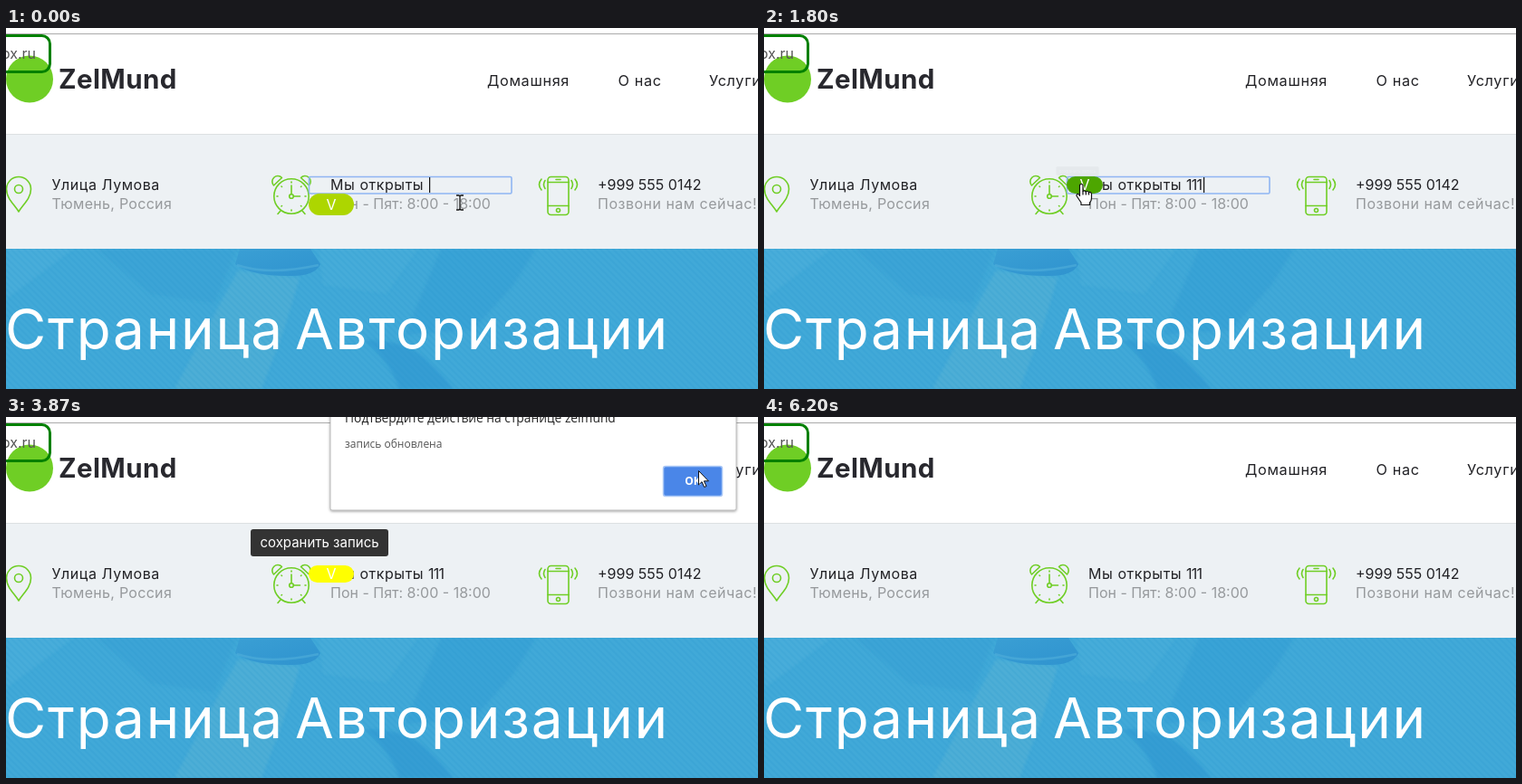
Animation, 830 px wide and 399 px high, one loop 6.63 s. Source, as an HTML page:

```html
<!DOCTYPE html>
<html lang="ru">
<head>
<meta charset="utf-8">
<title>Запись обновлена</title>
<style>
  html, body { margin: 0; width: 100%; height: 100%; overflow: hidden; background: #fff; }
  svg { display: block; width: 830px; height: 399px; }
  text { font-family: Inter, "Open Sans", sans-serif; font-size: 16px; font-optical-sizing: none; white-space: pre; }
  .dark { fill: #222226; letter-spacing: .55px; }
  .muted { fill: #96999c; letter-spacing: .3px; }
  .nav { fill: #222226; font-size: 16.3px; letter-spacing: .65px; }
  .title { fill: #fff; font-size: 62px; letter-spacing: 1.8px; }
  .icon { fill: none; stroke: #6fce25; stroke-width: 1.6; stroke-linecap: round; stroke-linejoin: round; }
  .system { font-family: "Open Sans", "Noto Sans", sans-serif; }
</style>
</head>
<body>
<svg viewBox="0 0 830 399" xmlns="http://www.w3.org/2000/svg">
  <defs>
    <pattern id="hatch" width="5" height="5" patternUnits="userSpaceOnUse" patternTransform="rotate(-45)">
      <rect width="2" height="5" fill="#2594cd"/>
    </pattern>
    <linearGradient id="sleeve" x2="1" y2="1">
      <stop stop-color="#3a9fd4"/><stop offset="1" stop-color="#2f93cf"/>
    </linearGradient>
    <clipPath id="banner"><rect y="244" width="830" height="155"/></clipPath>
    <filter id="soft" x="-20%" y="-20%" width="140%" height="140%"><feGaussianBlur stdDeviation="1.5"/></filter>
    <filter id="shadow" x="-5%" y="-10%" width="110%" height="125%">
      <feDropShadow dx="0" dy="1" stdDeviation="1.5" flood-opacity=".4"/>
    </filter>
  </defs>

  <rect width="830" height="399" fill="#fff"/>
  <rect y="6" width="830" height="1" fill="#aaa"/>
  <circle cx="26" cy="56.500" r="26" fill="#6fce25"/>
  <rect x="-30" y="8.500" width="78.500" height="40" rx="9" fill="none" stroke="#008000" stroke-width="3"/>
  <text x="33" y="34" text-anchor="end" fill="#555">ox.ru</text>
  <text x="58" y="67" fill="#28282e" style="font-size:29.500px;font-weight:650;letter-spacing:.4px">ZelMund</text>
  <text class="nav" x="531" y="64">Домашняя</text>
  <text class="nav" x="675.500" y="64">О нас</text>
  <text class="nav" x="776" y="64">Услуги</text>

  <rect y="117" width="830" height="127" fill="#edf1f4"/>
  <rect y="117" width="830" height="1" fill="#dde0e2"/>

  <g class="icon">
    <path d="M14 203C9 195 .5 188 .5 178a13.500 13.500 0 0 1 27 0C27.500 188 19 195 14 203z"/>
    <circle cx="14" cy="178" r="4.500"/>
    <circle cx="315" cy="186" r="19.200"/>
    <circle cx="315" cy="186" r="2.300"/>
    <path d="M315 174v9.500M317.500 186h7M303 202l-3 3.500M327 202l3 3.500M295.500 174a6 6 0 1 1 9-8.500zM334.500 174a6 6 0 1 0-9-8.500z"/>
    <path d="M315 170v1M315 201v1M299 186h1M330 186h1M304 175l.5.5M326 175l-.5.5M304 197l.5-.5M326 197l-.5-.5"/>
    <rect x="598" y="164.500" width="23" height="42" rx="3.500"/>
    <circle cx="609.500" cy="201.500" r="2"/>
    <path d="M598 170.500h23M598 196.500h23M607 167.500h5M595 168.500q-3 4.500 0 9M591 167q-5 6 0 12M624 168.500q3 4.500 0 9M628 167q5 6 0 12"/>
  </g>

  <text class="dark" x="50.500" y="179">Улица Лумова</text>
  <text class="muted" x="50.500" y="200">Тюмень, Россия</text>
  <text class="muted" x="358" y="200" style="letter-spacing:0">Пон - Пят: 8:00 - 18:00</text>
  <text class="dark" x="653" y="179" style="letter-spacing:0">+999 555 0142</text>
  <text class="muted" x="653" y="200" style="letter-spacing:.5px">Позвони нам сейчас!</text>

  <g clip-path="url(#banner)">
    <rect y="244" width="830" height="155" fill="#41a9d8"/>
    <g filter="url(#soft)">
      <path d="M0 244h75L0 300z" fill="#4fb1dc" opacity=".5"/>
      <path d="M100 244h155l-25 60-70-10z" fill="#369fd4" opacity=".5"/>
      <path d="M256 268l68 8-18 60-24 63h-96l40-75z" fill="#58b2d6" opacity=".6"/>
      <path d="M345 244h110l-35 50-70-10z" fill="#4cafda" opacity=".5"/>
      <path d="M480 244h105l-25 40-45 50-75 5z" fill="#349dd4" opacity=".5"/>
      <path d="M395 345q45 0 65 18t34 36h-60q-10-30-39-54z" fill="#2f97d0" opacity=".6"/>
    </g>
    <rect y="244" width="830" height="155" fill="url(#hatch)" opacity=".16"/>
    <path d="M258 244h78l11 17q-6 14-36 13-40 0-58-13z" fill="url(#sleeve)"/>
    <path d="M255 262q35 12 90 0" fill="none" stroke="#51b0da" stroke-width="2.500" opacity=".6"/>
  </g>
  <text class="title" x="-1" y="355">Страница</text>
  <text class="title" x="319" y="355">Авторизации</text>

  <rect id="field" x="334.500" y="164.500" width="223.500" height="18.500" rx="1.500" fill="none" stroke="#8fb5f2" stroke-width="1.600"/>
  <text class="dark" x="358" y="179">Мы открыты</text>
  <text class="dark" id="typed" x="466" y="179" style="letter-spacing:-.7px"></text>
  <rect id="caret" y="165" width="1.200" height="17" fill="#111"/>

  <g id="pill">
    <rect id="pillShape" x="334"/>
    <text id="pillLabel" fill="#fff" text-anchor="middle">V</text>
  </g>

  <g id="tip">
    <rect x="-76" y="-15" width="152" height="30" rx="3" fill="#333"/>
    <text y="5" text-anchor="middle" fill="#fff" style="font-size:15px">сохранить запись</text>
  </g>

  <g id="dialog">
    <rect x="358" y="-20" width="448" height="123" rx="2" fill="#fff" stroke="#aaa" stroke-width=".8" filter="url(#shadow)"/>
    <text class="system" x="374" y="6" fill="#222" style="font-size:13.800px">Подтвердите действие на странице zelmund</text>
    <text class="system" x="374" y="34" fill="#555" style="font-size:12px">запись обновлена</text>
    <rect x="725.500" y="54.500" width="65" height="33" rx="2.500" fill="#4a86e8" stroke="#a9c7f6" stroke-width="1.500"/>
    <text class="system" x="758" y="75" text-anchor="middle" fill="#fff" style="font-size:12px;font-weight:700">OK</text>
  </g>

  <g id="cursor" stroke-linejoin="round">
    <path id="beam" d="M-4-8h3l1 1 1-1h3M-4 8h3l1-1 1 1h3M0-7V7" fill="none" stroke="#111" stroke-width="1.300"/>
    <path id="arrow" d="M.5.5v15.500l3.600-3.400 2.600 5.900 2.300-1-2.600-5.700h5z" fill="#fff" stroke="#111"/>
    <g id="hand" fill="#fff" stroke="#111" stroke-width="1.200">
      <path d="M-1.500 1.500q2-2 3.500 0v7q1.500-1.500 3.300.5 1.700-1.300 3.200.7 2-.8 3 1.300v5q0 3-2 5v2.500H0V21l-5-7.500q0-2.500 2-2l1.500 2z"/>
      <path d="M2 8.500v4M5.300 9v3.500M8.500 10v2.500" fill="none"/>
    </g>
  </g>
</svg>

<script>
const LOOP = 6630;
const STEPS = [0, 130, 280, 560, 690, 840, 960, 1110, 1240, 1390, 1530, 1660, 1800, 1930, 2080, 2210,
  2480, 2620, 2750, 3050, 3180, 3320, 3470, 3620, 3870, 4150, 4290, 4430, 4530, 4660, 4810, 4930, 5080, 5210, 6070];

// time, x, y, shape
const POINTER = [
  [0, 501, 193, 'beam'], [840, 485, 190, 'beam'], [960, 461, 186, 'beam'], [1110, 415, 176, 'beam'],
  [1240, 373, 165, 'beam'], [1390, 365, 164, 'beam'], [1530, 350, 172, 'hand'],
  [3050, 560, 135, 'arrow'], [3180, 749, 90, 'arrow'], [3320, 795, 78, 'arrow'], [3470, 767, 58, 'arrow'],
  [3620, 764, 58, 'arrow'], [3870, 764, 59, 'arrow'], [4150, 763, 59, 'arrow'], [4430, 758, 64, 'arrow'],
  [4530, 740, 78, 'arrow'], [4660, 722, 92, 'arrow'], [4810, 650, 160, 'arrow'], [4930, 561, 238, 'arrow'],
  [5080, 553, 245, 'arrow'], [6070, 0, 0, 'none']
];

const $ = id => document.getElementById(id);
const set = (id, attrs) => { for (const k in attrs) $(id).setAttribute(k, attrs[k]); };
const show = (id, on) => { $(id).style.display = on ? '' : 'none'; };
const clamp = v => Math.min(1, Math.max(0, v));
const progress = (t, from, to) => clamp((t - from) / (to - from));
const mix = (a, b, p) => a + (b - a) * p;

function drawField(t) {
  const count = [130, 280, 560].filter(press => t >= press).length;
  $('typed').textContent = '1'.repeat(count);
  set('caret', { x: 467 + 6 * count });
  show('caret', t < 960 || (t >= 1530 && t < 2080));
  show('field', t < 2480);
}

function drawPill(t) {
  const editing = t < 1530;
  let width = 50, glow;
  if (editing) {
    glow = mix(.68, .6, t / 1530);
  } else if (t < 4290) {
    width = mix(20, 50, progress(t, 1530, 1935));
    glow = t < 1800 ? mix(.05, .3, progress(t, 1530, 1800)) : mix(.3, 1, progress(t, 1800, 2210));
  } else {
    const p = progress(t, 4290, 4730);
    width = 50 * (1 - p);
    glow = mix(1, .15, p);
  }
  const y = editing ? 183 : 164, height = editing ? 24 : 19;
  set('pillShape', {
    y, width, height, rx: Math.min(height / 2, width / 2),
    fill: `rgb(${255 * glow},${mix(128, 255, glow)},0)`
  });
  set('pillLabel', { x: 334 + width / 2, y: y + height / 2 + 5.5 });
  show('pill', width > 1);
}

function drawTip(t) {
  const p = progress(t, 1800, 2080);
  set('tip', {
    transform: `translate(346 ${mix(158, 139, p)}) scale(${mix(.31, 1, p)})`,
    opacity: t < 2210 ? mix(.04, .9, p) : 1
  });
  show('tip', t >= 1800 && t < 4430);
}

function drawDialog(t) {
  set('dialog', { opacity: t < 2750 ? .5 : 1 });
  show('dialog', t >= 2620 && t < 4290);
}

function drawCursor(t) {
  const [, x, y, shape] = POINTER.findLast(p => p[0] <= t);
  set('cursor', { transform: `translate(${x} ${y})` });
  for (const id of ['beam', 'arrow', 'hand']) show(id, id === shape);
}

function render(now) {
  const time = now % LOOP;
  const t = STEPS.findLast(s => s <= time);
  drawField(t);
  drawPill(t);
  drawTip(t);
  drawDialog(t);
  drawCursor(t);
}

const start = performance.now();
function tick() {
  render(performance.now() - start);
  requestAnimationFrame(tick);
}
tick();
</script>
</body>
</html>
```
